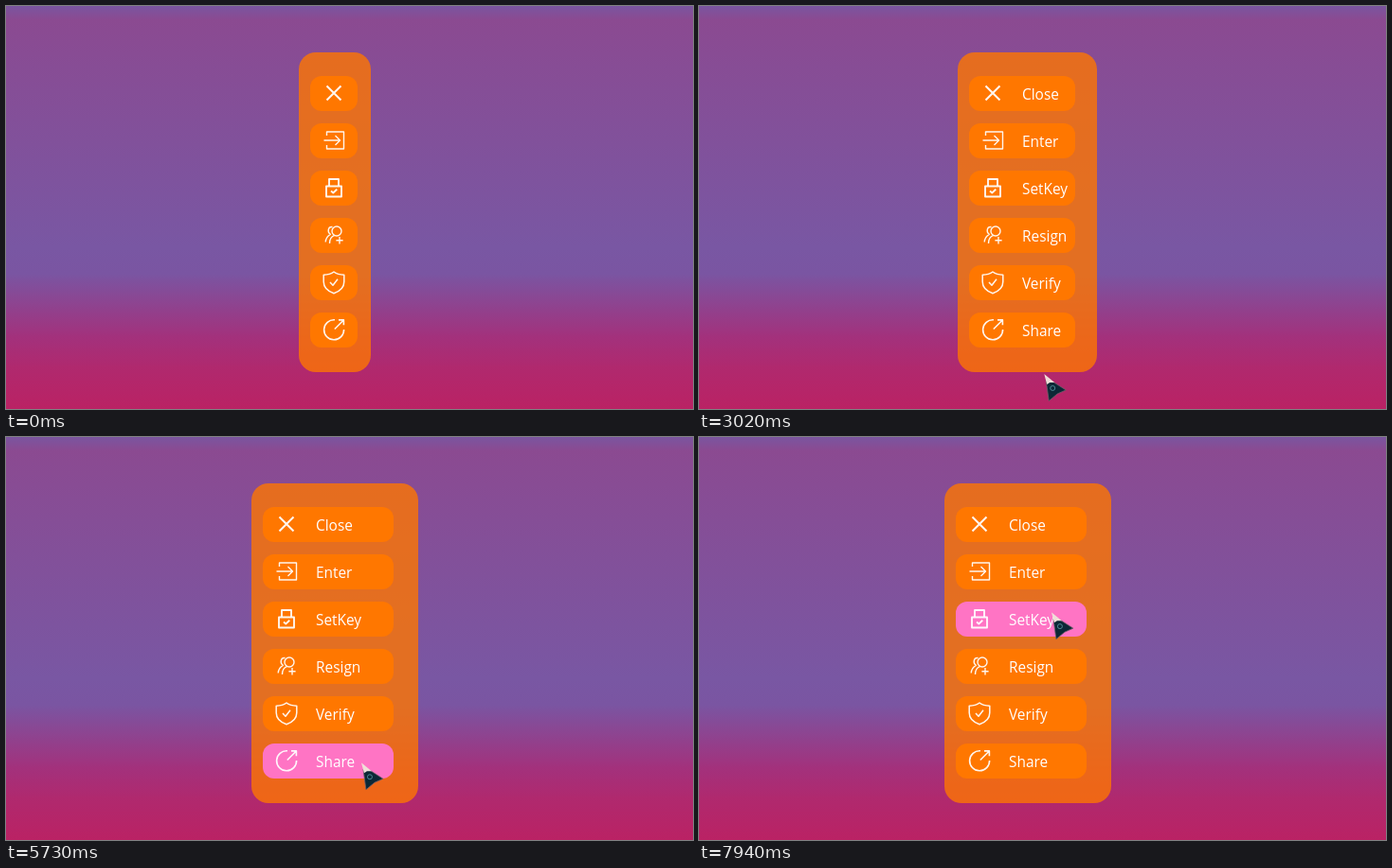
Recreate the animation shown at these times as an HTML page. Size 725 px wide and 426 px high, loop 8 s.

```html
<!DOCTYPE html>
<html lang="en">
<head>
<meta charset="utf-8">
<title>Expanding menu</title>
<style>
html, body { margin: 0; width: 100%; height: 100%; overflow: hidden; }
body {
  position: relative;
  background: linear-gradient(#7a559f, #8b4a91 15px, #884c94 50px, #7957a3 255px, #7a55a2 283px,
    #a3317c 350px, #b0296e 382px, #ba2264);
}
#panel {
  position: absolute; top: 49px; height: 338px;
  border-radius: 18px; background: rgba(255, 119, 0, .79);
}
.item {
  position: absolute; left: 12px; height: 37px;
  border-radius: 12px; overflow: hidden;
}
.item svg {
  position: absolute; left: 13px; top: 6px; width: 24px; height: 24px;
  overflow: visible; fill: none; stroke: #fff; stroke-opacity: .93;
}
.item span {
  position: absolute; left: 56px; top: 7.5px; line-height: 24px;
  font-family: "Open Sans", "Noto Sans", sans-serif; font-size: 15.4px; color: #fff; white-space: nowrap;
}
#cursor { position: absolute; left: 0; top: 0; width: 26px; height: 30px; }
</style>
</head>
<body>
<div id="panel"></div>
<svg id="cursor" viewBox="0 0 26 30">
  <path d="M2 7L9 8 23 17 14 21 5 28.5Z" fill="#0c2836" stroke="#70606a" stroke-width=".8"/>
  <path d="M0 0L11 9 6 9 3 11Z" fill="#f0dfd8"/>
  <circle cx="9" cy="15" r="2.5" fill="none" stroke="#4d8793"/>
</svg>
<script>
const LOOP = 8000;
const FADE = 160;
const GROW = 200;
const GLIDE = 330;
const HOP = 430;
const TOGGLES = [1530, 2950, 3674];

// label, icon path, stroke width
const ITEMS = [
  ["Close", "M4.5 4.5l15 15m0-15l-15 15", 2.1],
  ["Enter", "M4.5 7V3H22.5V21H4.5V17M1.5 12h17m-5-5l5 5-5 5", 1.4],
  ["SetKey", "M4 10.5H20V21.5H4ZM7 10V3H17v7M9 15.5l2.3 2 4-3.7", 1.9],
  ["Resign", "M10 8a5 5 0 1 1 10 0a5 5 0 1 1-10 0M7.5 21q0-7 5.5-8.7M10.5 3.5C5.5 3 5 9 8.3 11.3Q3.5 14 3.2 19.5M18 14v7.4m-3.6-3.7h7.2", 1.4],
  ["Verify", "M12 1Q8 4 1.2 4.2V11.5Q1.2 20 12 23.7Q22.8 20 22.8 11.5V4.2Q16 4 12 1ZM8 12l3 3.3 5-6.5", 1.5],
  ["Share", "M13 1.8A10.5 10.5 0 1 0 22.6 12M12.8 11.5l9-9M17 1.9h5.4v5.4", 1.6]
];

// pointer key points: start, x, y
const GLIDES = [[720, 377, 406], [1400, 363, 385], [2900, 367, 398], [3560, 371, 377]];
const HOP_Y = [355, 302, 256, 195, 142];

const panel = document.getElementById("panel");
const cursor = document.getElementById("cursor");

const items = ITEMS.map(([label, icon, weight], i) => {
  const el = document.createElement("div");
  el.className = "item";
  el.style.top = 25 + 50 * i + "px";
  el.innerHTML = `<svg viewBox="0 0 24 24" stroke-width="${weight}" stroke-linejoin="round"><path d="${icon}"/></svg><span>${label}</span>`;
  panel.append(el);
  return el;
});

const ramp = (t, start, length) => Math.min(1, Math.max(0, (t - start) / length));
const smooth = u => u * u * (3 - 2 * u);
const easeOut = u => u * (2 - u);
const mix = (a, b, u) => a + (b - a) * u;

function pointerAt(t) {
  let x = 382, y = 424;
  const move = (toX, toY, u) => {
    x = mix(x, toX, u);
    y = mix(y, toY, u);
  };
  for (const [start, toX, toY] of GLIDES) move(toX, toY, smooth(ramp(t, start, GLIDE)));
  HOP_Y.forEach((toY, k) => {
    const start = k ? 4947 + 738 * k : 5060;
    move(375 - .3 * k * k, toY, easeOut(ramp(t, start, HOP)));
  });
  return [x, y];
}

// share of the last FADE ms that the pointer spent on a row
function hoverAt(t, row) {
  const steps = 32, top = 74 + 50 * row;
  let inside = 0;
  for (let i = 0; i < steps; i++) {
    const y = pointerAt(t - FADE * i / steps)[1];
    if (y > top && y < top + 37) inside++;
  }
  return inside / steps;
}

function draw(t) {
  const open = TOGGLES.reduce((sum, start, i) => sum + (i % 2 ? -1 : 1) * smooth(ramp(t, start, GROW)), 0);
  const width = 76 + 100 * open;
  panel.style.left = Math.floor(347 - width / 2) + "px";
  panel.style.width = Math.floor(width) + "px";

  items.forEach((el, i) => {
    const hover = hoverAt(t, i);
    el.style.width = Math.floor(50 + 88 * open) + "px";
    el.style.background = `rgb(255, ${mix(119, 116, hover)}, ${mix(0, 196, hover)})`;
  });

  const [x, y] = pointerAt(t);
  cursor.style.visibility = t < 840 ? "hidden" : "visible";
  cursor.style.transform = `translate(${x}px, ${y}px)`;
}

function tick() {
  draw(performance.now() % LOOP);
  requestAnimationFrame(tick);
}
tick();
</script>
</body>
</html>
```
